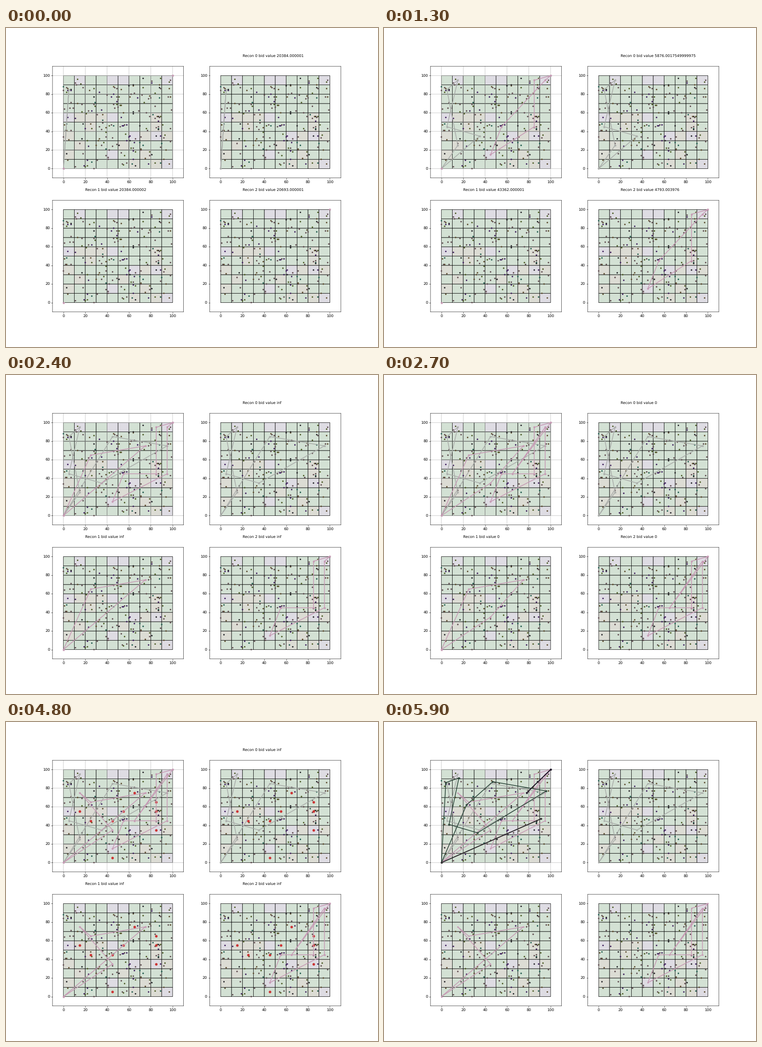
A matplotlib script that plays this animation: 808x693 px, repeating every 6000 ms.

```python
import random

import matplotlib.pyplot as plt
from matplotlib.animation import FuncAnimation
from matplotlib.collections import PatchCollection
from matplotlib.patches import Rectangle

FRAMES, INTERVAL = 60, 100
DPI = 57.75
RESCUE = 50  # frame at which the rescue phase begins

GREEN, LILAC, BEIGE = "#d3e1d4", "#dedce3", "#dcdcd4"
GREY, PINK, RED = "#a9aca9", "#c69ab4", "#cc3333"
DOT_COLOURS = ["#3d1c5c", "#5e4a4e", "#5b4a2c", "#4a5a22", "#1d5a4c", "#222226"]
DOT_WEIGHTS = [4, 7, 3, 4, 2, 2]
DOT_COUNT = 200

# column and row of the lilac cells; beige ones are scattered lower down
LILAC_CELLS = [(1, 9), (4, 9), (5, 9), (9, 9), (0, 5), (4, 5), (6, 3), (8, 3),
               (4, 1), (9, 0)]

# home, colour and tour of each scout; a stop is x, y, first frame, end frame
SCOUTS = [
    ((0, 0), GREY, [(15, 25, 2), (5, 85, 0), (15, 95, 8), (5, 45, 10),
                    (35, 35, 12), (95, 75, 15), (45, 85, 14)]),
    ((0, 0), PINK, [(25, 65, 24, 31), (75, 75, 23), (25, 65, 31),
                    (15, 75, 31), (45, 35, 25)]),
    ((100, 100), PINK, [(85, 95, 1), (85, 45, 7), (55, 45, 16), (45, 15, 9),
                        (55, 45, 11, 16), (95, 45, 16), (95, 95, 13),
                        (65, 45, 26)]),
]

# rescuers reach one casualty per frame, in this order
RESCUERS = [((0, 0), "#2b4539"), ((0, 0), "#332f33"), ((100, 100), "#1f1729")]
CASUALTIES = [(0, 4, 86), (0, 16, 91), (0, 7, 41), (0, 33, 32), (0, 96, 77),
              (0, 47, 87), (2, 78, 75), (0, 23, 62), (1, 87, 45), (1, 91, 47)]

# red finds: x, y, first frame
FINDS = [(25, 45, 32), (65, 75, 34), (85, 35, 35), (15, 55, 37), (55, 55, 38),
         (85, 55, 41), (45, 5, 42), (85, 65, 45), (45, 45, 48)]

# bids from a given frame on: one per scout, or one shared by all
BIDS = {
    0: ["20384.000001", "20384.000002", "20693.000001"],
    3: ["inf"],
    4: ["0"],
    7: ["inf", "20693.000001", "5883.000424999998"],
    8: ["5876.0017549999975", "43362.000001", "4793.003976"],
    17: ["0"],
    23: ["inf"],
    27: ["0"],
    31: ["inf"],
}


def make_terrain():
    rng = random.Random(5)
    low = [(col, row) for col in range(10) for row in range(6)
           if (col, row) not in LILAC_CELLS]
    terrain = dict.fromkeys(rng.sample(low, 15), BEIGE)
    terrain.update(dict.fromkeys(LILAC_CELLS, LILAC))
    return terrain


def make_dots():
    rng = random.Random(12)
    dots = [(x, y) for _, x, y in CASUALTIES]
    while len(dots) < DOT_COUNT:
        dots.append((rng.randint(0, 99), rng.randint(0, 99)))
    return dots, rng.choices(DOT_COLOURS, DOT_WEIGHTS, k=DOT_COUNT)


def scout_stops(stops, frame):
    return [(x, y) for x, y, start, *end in stops
            if start <= frame < (end[0] if end else FRAMES)]


def rescue_stops(rescuer, frame):
    reached = CASUALTIES[:max(0, frame - RESCUE + 1)]
    return [(x, y) for who, x, y in reached if who == rescuer]


def draw_map(ax):
    places = [(col, row) for row in range(10) for col in range(10)]
    cells = [Rectangle((10 * col, 10 * row), 10, 10) for col, row in places]
    colours = [terrain.get(place, GREEN) for place in places]
    ax.add_collection(PatchCollection(cells, facecolors=colours,
                                      edgecolors="black", linewidths=1,
                                      zorder=1))
    ax.scatter(*zip(*dots), s=10, c=dot_colours, linewidths=0.8, zorder=1.7)
    ax.set(xlim=(-10, 110), ylim=(-10, 110))


def add_line(ax, colour, zorder=2):
    return ax.plot([], [], "-*", color=colour, lw=2, zorder=zorder)[0]


def set_tour(line, home, stops):
    line.set_data(*zip(home, *stops, home))


plt.rcParams.update({"path.snap": False, "text.hinting": "none"})
fig, axes = plt.subplots(2, 2, figsize=(808 / DPI, 693 / DPI), dpi=DPI)
panels = list(axes.flat)
terrain = make_terrain()
dots, dot_colours = make_dots()
for ax in panels:
    draw_map(ax)
panels[0].grid(True)

finds = [ax.plot([], [], "o", color=RED, zorder=1.8)[0] for ax in panels]
titles = [ax.text(20, 120, "") for ax in panels[1:]]
scout_lines = [(add_line(panels[0], colour), add_line(ax, colour))
               for ax, (_, colour, _) in zip(panels[1:], SCOUTS)]
rescue_lines = [add_line(panels[0], colour, 3) for _, colour in RESCUERS]


def update(frame):
    rescue = frame >= RESCUE

    for pair, (home, _, stops) in zip(scout_lines, SCOUTS):
        for line in pair:
            set_tour(line, home, scout_stops(stops, frame))
            line.set_marker("o" if rescue else "*")
            line.set_markersize(3 if rescue else 6)

    for i, (line, (home, _)) in enumerate(zip(rescue_lines, RESCUERS)):
        set_tour(line, home, rescue_stops(i, frame))
        line.set_visible(rescue)

    found = [(x, y) for x, y, start in FINDS if start <= frame and not rescue]
    for marks in finds:
        marks.set_data([x for x, _ in found], [y for _, y in found])

    bids = BIDS[max(start for start in BIDS if start <= frame)]
    for i, title in enumerate(titles):
        bid = bids[i % len(bids)]
        title.set_text("" if rescue else f"Recon {i} bid value {bid}")
    return []


anim = FuncAnimation(fig, update, frames=FRAMES, interval=INTERVAL,
                     init_func=lambda: update(0), repeat=True, repeat_delay=0)
plt.show()
```
